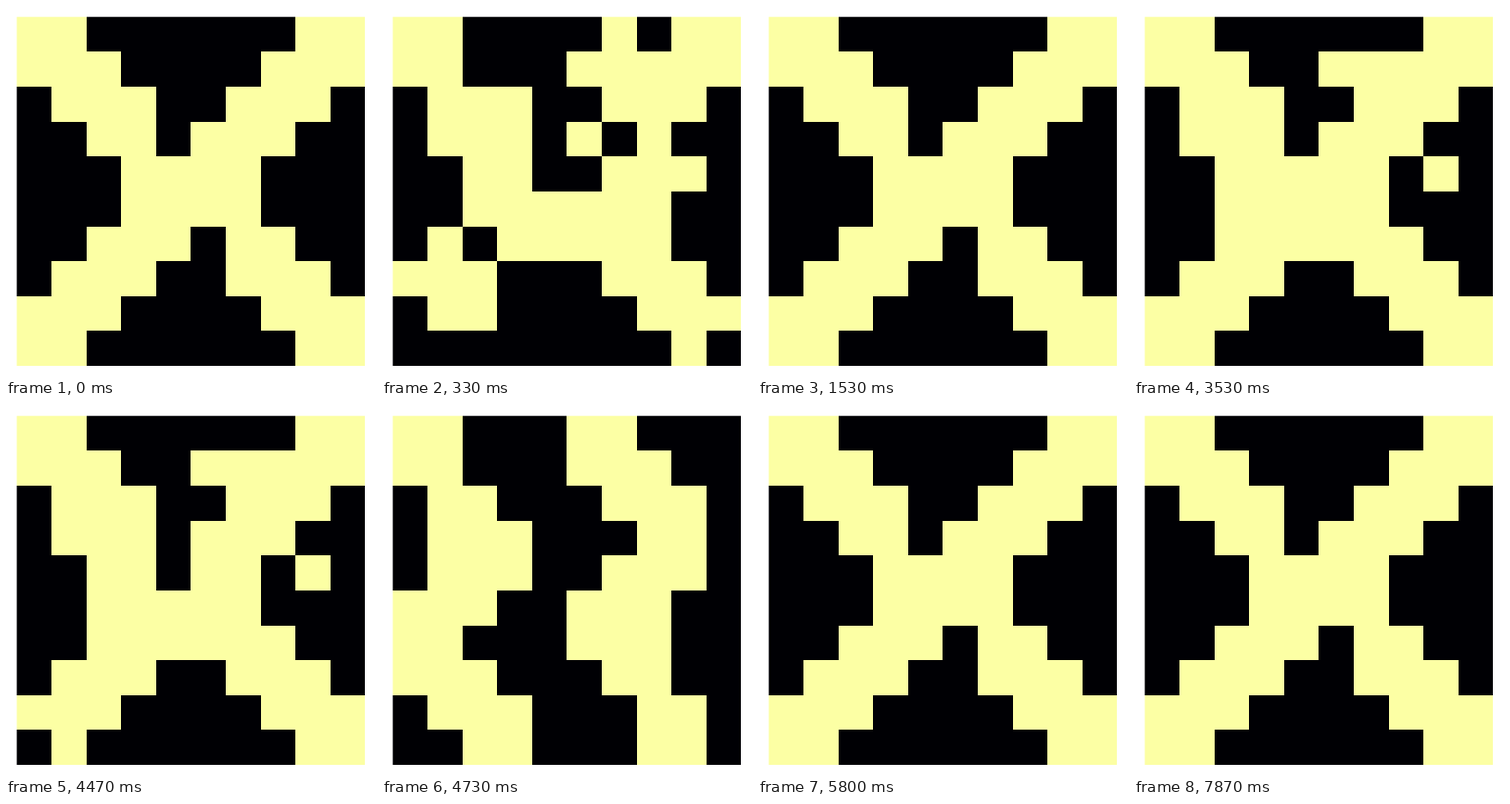
An HTML page with a canvas for the animation above (8000 ms loop, 399 by 400 pixels).

```html
<!DOCTYPE html>
<html lang="en">
<head>
<meta charset="utf-8">
<title>Flipping cells</title>
<style>
  html, body { margin: 0; width: 100%; height: 100%; overflow: hidden; background: #fff; }
  canvas { display: block; }
</style>
</head>
<body>
<canvas id="stage" width="399" height="400"></canvas>
<script>
const ctx = document.getElementById('stage').getContext('2d');
const SIZE = 10, LOOP = 8000, TICK = 1000 / 15, PERIOD = 64;
const DARK = '#000004', LIGHT = '#fcffa4';

// Resting cross: 1 is a light cell.
const cross = [
  '1100000011',
  '1110000111',
  '0111001110',
  '0011011100',
  '0001111000',
  '0001111000',
  '0011101100',
  '0111001110',
  '1110000111',
  '1100000011'
].join('');

// Cells that flip on the way to the stripes: a first, then b, then c.
const waves = [
  '.....cb.cc',
  '..b..aa.cc',
  '...c......',
  '.a...cb.c.',
  '.ca.bb.ba.',
  'ccacc..b..',
  'cbbcca....',
  'b..b....c.',
  'b..c.....c',
  'bbcc...c.b'
].join('');

const shuffle = i => (i * 37 + 11) % 101;
const order = Array.from(waves, (wave, i) => ({ wave, i }))
  .filter(cell => cell.wave !== '.')
  .sort((p, q) => p.wave.localeCompare(q.wave) || shuffle(p.i) - shuffle(q.i))
  .map(cell => cell.i);

// [tick, number of flipped cells]
const steps = [
  [0, 0], [2, 4], [3, 9], [4, 15], [5, 22], [6, 33], [7, 44],
  [19, 35], [20, 26], [21, 18], [22, 9], [23, 0],
  [53, 7], [54, 0]
];

// Inner grid lines are snapped to pixels.
const line = (start, pitch) => i => i ? Math.round(start + pitch * i) : start;
const colX = line(11.6, 37.57), rowY = line(11.72, 37.64);

function draw(count) {
  const flipped = new Set(order.slice(0, count));
  ctx.fillStyle = '#fff';
  ctx.fillRect(0, 0, 399, 400);
  for (let i = 0; i < SIZE * SIZE; i++) {
    const c = i % SIZE, r = Math.floor(i / SIZE);
    const light = (cross[i] === '1') !== flipped.has(i);
    ctx.fillStyle = light ? LIGHT : DARK;
    ctx.fillRect(colX(c), rowY(r), colX(c + 1) - colX(c), rowY(r + 1) - rowY(r));
  }
}

const origin = performance.now();
let shown = -1;

function frame() {
  const t = Math.max(0, performance.now() - origin) % LOOP;
  // Changes fall on ticks rounded to 10 ms, so look slightly ahead.
  const tick = Math.floor((t + 4) / TICK) % PERIOD;
  const count = steps.filter(s => s[0] <= tick).pop()[1];
  if (count !== shown) draw(shown = count);
  requestAnimationFrame(frame);
}
frame();
</script>
</body>
</html>
```
